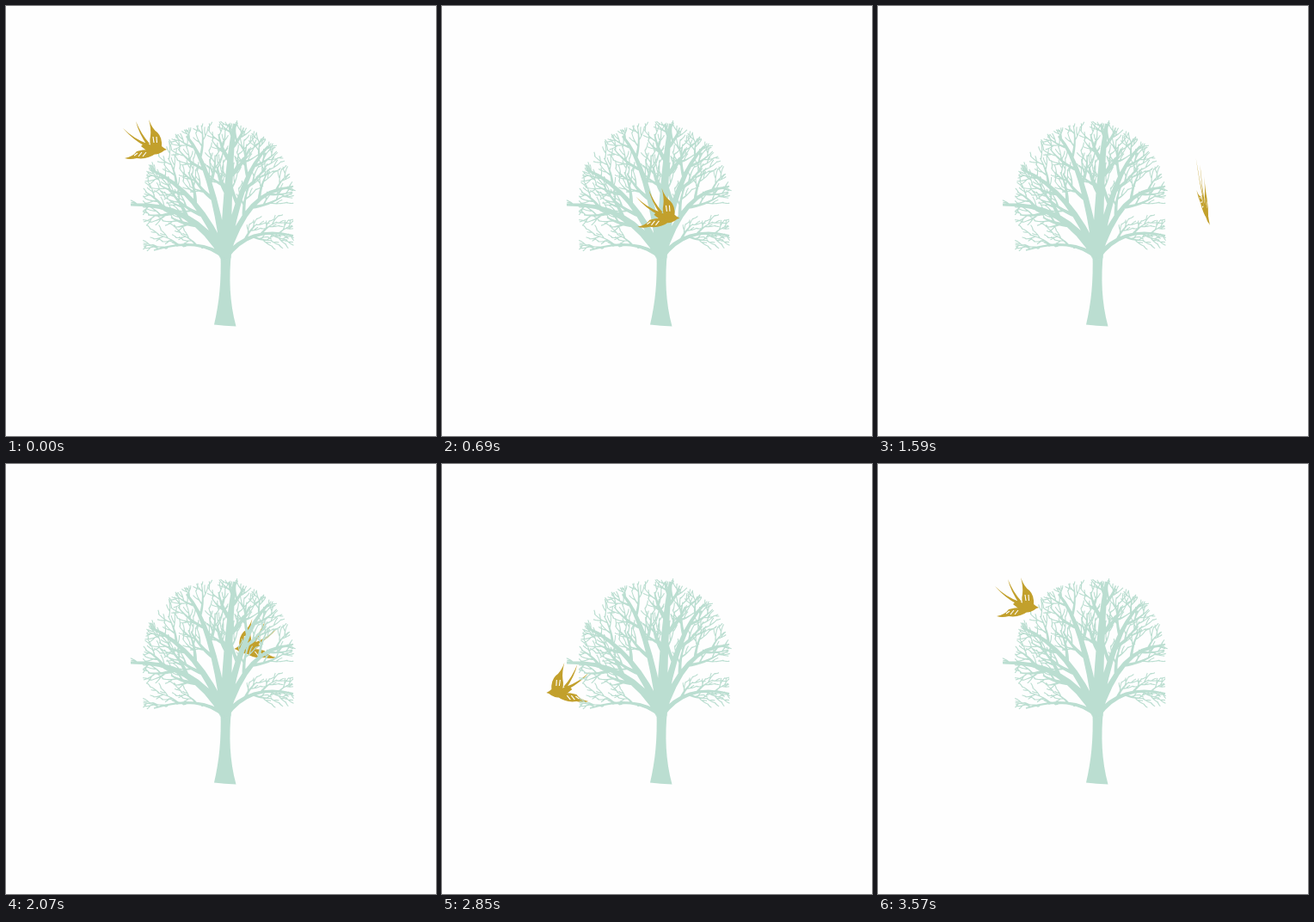
An HTML page for the animation above (3.6 s loop, 500 px wide and 500 px high).

```html
<!DOCTYPE html>
<html lang="en">
<head>
<meta charset="utf-8">
<title>Bird around a tree</title>
<style>
html, body { margin: 0; width: 100%; height: 100%; overflow: hidden; background: #fefefe; }
svg { display: block; width: 100vw; height: 100vh; }
</style>
</head>
<body>
<svg id="stage" viewBox="0 0 500 500">
  <g id="tree" fill="#bbded1">
    <path d="M242 370.5C248 345 250.500 320 249.500 288L262 286C259 316 260 345 267.500 372.500Q254 372 242 370.500Z"/>
    <path id="crown"/>
  </g>
  <g id="bird" fill="#c2a02c">
    <path d="M25 12L21.500 10Q18 6 13 9L-1 4L-5 8L0 12Q8 19 15 17Q20 15 22 13Z"/>
    <path d="M0 8Q-14 1 -26 -13Q-14 -1 2 5ZM2 7Q-8 -8 -11 -21Q-5 -6 5 5Z"/>
    <path d="M4 -23Q8 -12 14 -8Q20 -2 19 9L8 13Q4 4 6 -4Q7 -12 4 -23Z"/>
    <path d="M-24 22Q-14 20 -10 14Q-4 12 4 12L13 16Q2 24 -10 22Q-18 24 -24 22Z"/>
    <path d="M9 -3L10 4M13 -3L13.500 4M-13 19L-9 16M-8 20L-4 15M-3 20L1 15" stroke="#fefefe" stroke-width="1.1"/>
  </g>
</svg>
<script>
const stage = document.getElementById("stage");
const tree = document.getElementById("tree");
const bird = document.getElementById("bird");
const LOOP = 3600, STEP = 30, LAP = 3570;
const mix = (a, b, u) => a + (b - a) * u;

let seed = 11;
const rand = () => (seed = seed * 16807 % 2147483647) / 2147483647;

// The crown is a dome with a nearly flat underside.
function inside(x, y) {
  const dx = Math.abs(x - 247) / 88;
  return dx < 1 && y < 270 + dx * 18 && (y > 222 || Math.hypot(dx, (y - 222) / 88) < 1);
}

const curve = (b, u) => ["x", "y"].map(k => mix(mix(b[k][0], b[k][1], u), mix(b[k][1], b[k][2], u), u));
const width = (b, u) => Math.max(1.1, mix(b.w, b.w * 0.3, u));
function angle(b, u) {
  const d = k => mix(b[k][1] - b[k][0], b[k][2] - b[k][1], u);
  return Math.atan2(d("y"), d("x"));
}

function outline(b) {
  const left = [], right = [];
  for (let i = 0; i <= 8; i++) {
    const u = i / 8, [x, y] = curve(b, u), a = angle(b, u), w = width(b, u) / 2;
    const nx = Math.sin(a) * w, ny = -Math.cos(a) * w;
    left.push([x + nx, y + ny]);
    right.unshift([x - nx, y - ny]);
  }
  return "M" + left.concat(right).map(p => p.map(v => v.toFixed(1)).join(" ")).join("L") + "Z";
}

// Main limbs rise from the fork and bend out to their tips.
function limb([x, y, w]) {
  return { x: [255, mix(255, x, 0.35), x], y: [293, mix(290, y, 0.75) - (y > 200 ? 18 : 0), y], w };
}

function shoot(parent, u, side, len) {
  const [x, y] = curve(parent, u);
  let a = angle(parent, u) + side * mix(0.5, 0.75, rand());
  const out = Math.atan2(y - 275, x - 250);
  a += 0.25 * Math.sin(out - a);
  for (let i = 0; i < 8 && !inside(x + Math.cos(a) * len, y + Math.sin(a) * len); i++) len *= 0.82;
  const bend = a + side * 0.25;
  return {
    x: [x, x + Math.cos(bend) * len / 2, x + Math.cos(a) * len],
    y: [y, y + Math.sin(bend) * len / 2, y + Math.sin(a) * len],
    w: Math.max(1.5, width(parent, u) * 0.72), len
  };
}

function grow(b, len, count, depth) {
  const parts = [b];
  for (let i = 0; depth && i < count; i++) {
    const u = mix(0.36, 0.95, i / (count - 1));
    const child = shoot(b, u, i % 2 ? 1 : -1, len * mix(0.85, 1.15, rand()));
    if (child.len > 4) parts.push(...grow(child, len * 0.5, Math.max(2, count - 2), depth - 1));
  }
  return parts;
}

// Limb tips and root widths
const tips = [
  [172, 284, 5], [145, 231, 10], [168, 190, 9], [210, 151, 9],
  [266, 137, 13], [305, 163, 9], [330, 211, 8], [334, 267, 6]
];
const branches = tips.flatMap(tip => grow(limb(tip), tip[1] > 260 ? 24 : 38, 6, 3));
document.getElementById("crown").setAttribute("d", branches.map(outline).join(""));

// Key points of the closed flight path: time, x, y
const path = [
  [0, 162, 155], [540, 230, 219], [1050, 305, 259], [1590, 378, 217], [1800, 350, 183],
  [2160, 271, 212], [2580, 193, 250], [2790, 156, 259], [3120, 108, 217], [3300, 107, 193]
];

function key(i) {
  const n = path.length, [t, x, y] = path[(i + n) % n];
  return [t + Math.floor(i / n) * LAP, x, y];
}

function slope(i, k) {
  const p = key(i - 1), q = key(i + 1);
  return (q[k] - p[k]) / (q[0] - p[0]);
}

function place(t, k) {
  const i = path.filter(p => p[0] <= t).length - 1;
  const p = key(i), q = key(i + 1), h = q[0] - p[0], u = (t - p[0]) / h, v = 1 - u;
  return p[k] * (1 + 2 * u) * v * v + q[k] * u * u * (3 - 2 * u)
    + h * u * v * (slope(i, k) * v - slope(i + 1, k) * u);
}

function ease(t, from, to) {
  const u = Math.min(1, Math.max(0, (t - from) / (to - from)));
  return u * u * (3 - 2 * u);
}

function draw(t) {
  const turn = Math.PI * (ease(t, 1450, 1775) + ease(t, 3150, 3450));
  const a = Math.cos(turn), b = Math.abs(Math.sin(turn)) * 1.1;
  const x = place(t % LAP, 1), y = place(t % LAP, 2);
  bird.setAttribute("transform", `matrix(${[a, b, 0, 1, x, y].map(v => v.toFixed(3)).join(" ")})`);
  stage.insertBefore(bird, t >= 1620 && t < 3300 ? tree : null);
}

function tick() {
  draw(Math.floor(performance.now() % LOOP / STEP) * STEP);
  requestAnimationFrame(tick);
}
tick();
</script>
</body>
</html>
```
